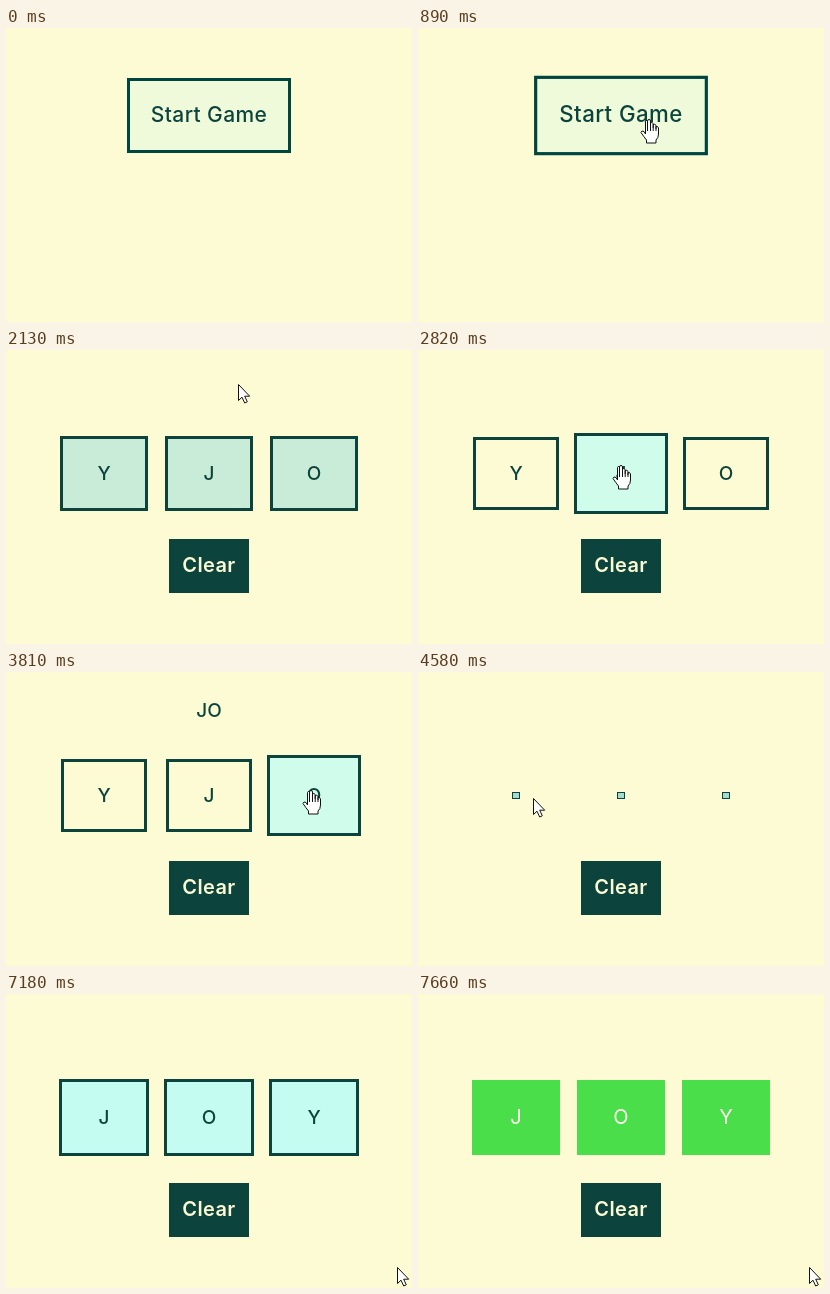
Recreate the animation shown at these times as an HTML page. Size 406 px wide and 294 px high, loop 8 s.

```html
<!DOCTYPE html>
<html lang="en">
<meta charset="utf-8">
<title>Word game</title>
<style>
  html, body { margin: 0; height: 100%; overflow: hidden; background: #fcfbd4; }
  svg { display: block; }
  text { font: 500 19px Inter, "Open Sans", sans-serif; text-anchor: middle; fill: #0c443d; }
  #start text { font-size: 21px; letter-spacing: .4px; }
  #clear text { font-size: 20px; font-weight: 600; letter-spacing: .4px; fill: #fcfbd4; }
  #cursor path { fill: #fff; stroke: #111; stroke-linejoin: round; }
</style>
<svg width="406" height="294" viewBox="0 0 406 294">
  <g id="start">
    <rect x="122.5" y="51.5" width="161" height="72" fill="#effada" stroke="#00453f" stroke-width="3"/>
    <text x="203" y="94">Start Game</text>
  </g>
  <text id="word" x="203" y="45"></text>
  <g id="tiles"></g>
  <g id="clear">
    <rect x="163" y="189" width="80" height="54" fill="#0c443d"/>
    <text x="203" y="222">Clear</text>
  </g>
  <g id="cursor">
    <path id="arrow" d="M.5.5V16.5L4 13.2 6.7 19 9.3 17.8 6.7 12.2H11.7Z"/>
    <path id="hand" d="M-1.5 12V2Q-1.5.5 0 .5T1.5 2V8 4Q3 2.8 4.2 4.5V9 5.5Q6 4.7 7 6.3V10 7.5Q9 7 9.5 9V15Q9.5 19 7 21V24H-2.5V21Q-5 18-8 13.5-7.5 11-5 12.5L-3.5 15V2.5Q-3 .5-1.5 2ZM1.5 8V12M4.2 9V12M7 10V12"/>
  </g>
</svg>
<script>
const LOOP = 8000, CENTERS = [98, 203, 308];
const DARK = [12, 68, 61], PAPER = [252, 251, 212], MINT = [171, 228, 217],
  TEAL = [163, 219, 210], GLOW = [197, 252, 241], HOVER = [207, 252, 235], GREEN = [75, 222, 75];

const $ = id => document.getElementById(id);
const set = (el, attrs) => { for (const k in attrs) el.setAttribute(k, attrs[k]); };
const show = (el, on) => { el.style.display = on ? '' : 'none'; };
const ramp = (t, a, b) => Math.min(1, Math.max(0, (t - a) / (b - a)));
const smooth = u => u * u * (3 - 2 * u);
const easeOut = u => 1 - (1 - u) ** 2;
const lerp = (a, b, u) => a + (b - a) * u;
const mix = (a, b, u) => a.map((v, i) => lerp(v, b[i], u));
const rgb = c => `rgb(${c.map(Math.round)})`;
const between = (t, a, b) => t >= a && t < b;
const pulse = (t, a, b) => smooth(ramp(t, a, a + 140)) * (1 - smooth(ramp(t, b, b + 140)));

// Cursor stops: time, x, y
const PATH = [
  [0, 410, 252], [70, 400, 250], [820, 232, 92], [1000, 228, 88], [1570, 226, 80],
  [2000, 232, 24], [2300, 232, 48], [2480, 230, 50], [2780, 203, 115], [3300, 203, 115],
  [3480, 258, 138], [3640, 305, 118], [3830, 305, 118], [4160, 100, 119], [4440, 104, 119],
  [4580, 115, 126], [5000, 335, 216], [5570, 360, 237], [5850, 387, 262], [6190, 391, 273]
];
// Hover spans for each tile, left to right
const HOVERS = [[4180, 4400], [2680, 3330], [3570, 3860]];

function cursorAt(t) {
  const i = PATH.findIndex(p => p[0] > t);
  if (i < 0) return PATH[PATH.length - 1].slice(1);
  const a = PATH[i - 1], b = PATH[i];
  return mix(a, b, smooth(ramp(t, a[0], b[0]))).slice(1);
}

const tiles = CENTERS.map(x => {
  const [box, label] = ['rect', 'text'].map(n =>
    $('tiles').appendChild(document.createElementNS('http://www.w3.org/2000/svg', n)));
  set(label, { x, y: 130 });
  return { x, box, label };
});

// Grow to a peak, then settle at the resting width
const spring = (t, from, peak, rest) =>
  peak * easeOut(ramp(t, from, from + 800)) + (rest - peak) * smooth(ramp(t, from + 800, from + 1020));

function tileState(t, i) {
  if (t < 4547) {
    const h = pulse(t, ...HOVERS[i]);
    const rest = mix(MINT, PAPER, ramp(t, 1960, 2440));
    const shrink = 1 - smooth(ramp(t, 4430, 4547));
    return { w: (spring(t, 1160, 94, 86) + 7 * h) * shrink, fill: mix(rest, HOVER, h), win: 0 };
  }
  const win = ramp(t, 7180, 7600);
  const pop = 8 * smooth(ramp(t, 7180, 7390)) - 10 * smooth(ramp(t, 7390, 7640));
  const lit = mix(TEAL, GLOW, ramp(t, 5570, 5850));
  return { w: spring(t, 4547, 98, 90) + pop, fill: mix(lit, GREEN, win), win };
}

function drawTile({ x, box, label }, t, i) {
  const s = tileState(t, i);
  const w = 2 * Math.round(s.w / 2), h = 2 * Math.round((w * .853 - 1) / 2) + 1;
  const on = t > 1160 && w > 2;
  show(box, on);
  show(label, on && w > 24);
  if (!on) return;
  const line = Math.max(1, Math.round(w / 32));
  set(box, {
    x: x - w / 2 + line / 2, y: 123.5 - h / 2 + line / 2,
    width: Math.max(0, w - line), height: Math.max(0, h - line),
    fill: rgb(s.fill), stroke: rgb(mix(DARK, GREEN, s.win)), 'stroke-width': line
  });
  label.textContent = (t < 4547 ? 'YJO' : 'JOY')[i];
  label.style.fill = rgb(mix(DARK, [255, 255, 240], s.win));
  label.style.fontWeight = s.win > .5 ? 400 : 500;
  label.style.fontSize = lerp(19, 20, s.win) + 'px';
}

function draw(t) {
  const startScale = (1 + .06 * smooth(ramp(t, 600, 780))) * (1 - smooth(ramp(t, 960, 1160)));
  show($('start'), t < 1160);
  set($('start'), { transform: `translate(203 87.5) scale(${startScale}) translate(-203 -87.5)` });
  show($('clear'), t >= 1160);
  tiles.forEach((tile, i) => drawTile(tile, t, i));

  const typed = t >= 4430 ? 0 : [3040, 3730, 4290].filter(k => t >= k).length;
  $('word').textContent = 'JOY'.slice(0, typed);

  const pointing = between(t, 640, 1060) || HOVERS.some(([a, b]) => between(t, a, b + 30));
  show($('hand'), pointing);
  show($('arrow'), !pointing);
  set($('cursor'), { transform: `translate(${cursorAt(t).map(Math.round)})` });
}

const begin = performance.now();
function frame() {
  draw((performance.now() - begin) % LOOP);
  requestAnimationFrame(frame);
}
frame();
</script>
</html>
```
